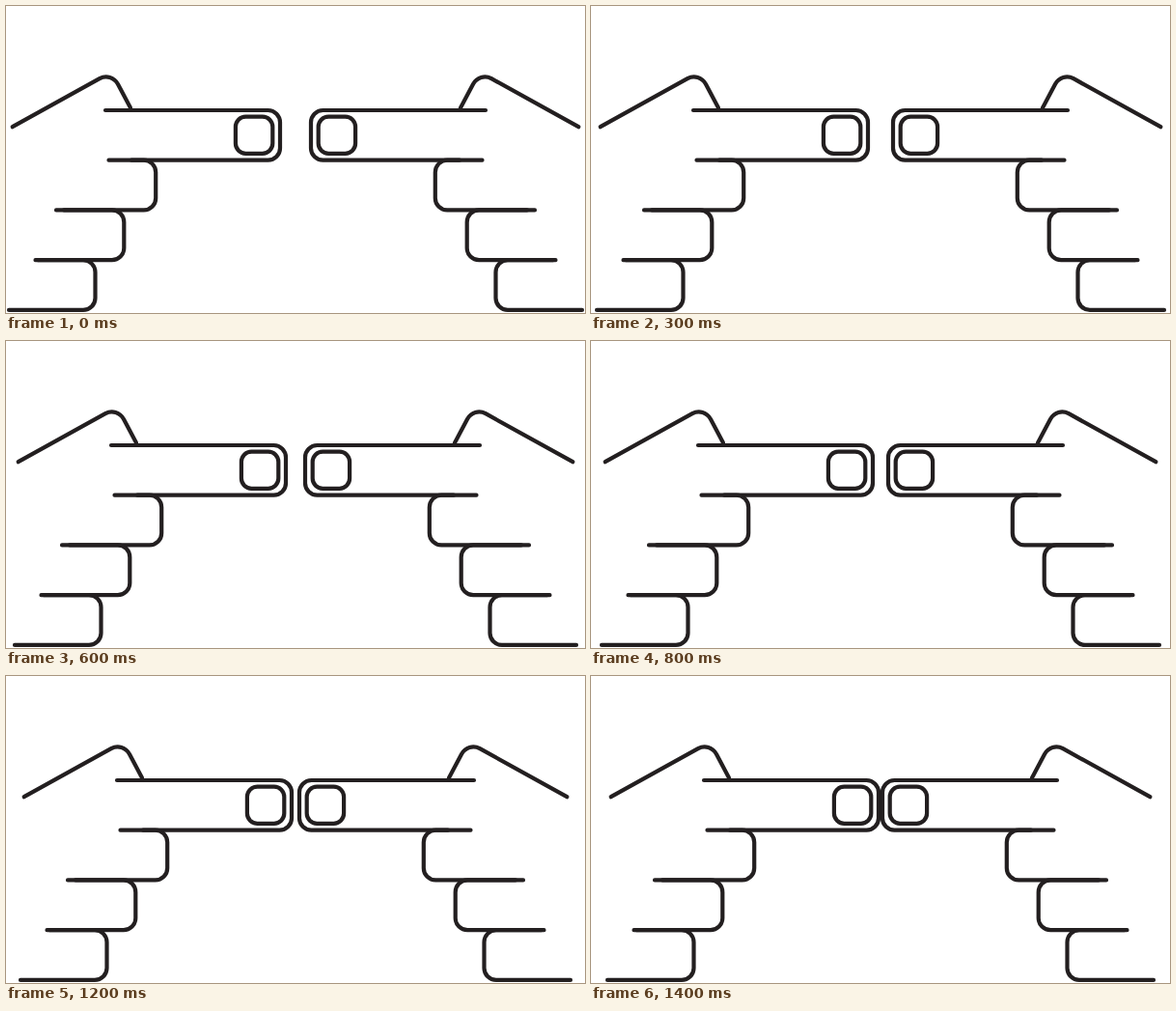
Write an HTML page that moves like this. It is 600 px wide and 318 px high and loops after 1.6 s.

```html
<!DOCTYPE html>
<html lang="en">
<head>
<meta charset="utf-8">
<title>Pointing hands</title>
<style>
  html, body { margin: 0; width: 100%; height: 100%; overflow: hidden; background: #fff; }
  svg { display: block; width: 600px; height: 318px; }
</style>
</head>
<body>
<svg viewBox="0 0 600 318" fill="none" stroke="#231f20" stroke-width="4.2" stroke-linecap="round" stroke-linejoin="round">
  <defs>
    <g id="hand">
      <path d="M6.7 125.2L97 75.2C104 71.5 112 74 116 81L129 105.5"/>
      <path d="M103 108H271.5a12.5 12.5 0 0 1 12.5 12.5V147.2a12.5 12.5 0 0 1-12.5 12.5H106.5"/>
      <rect x="237.9" y="114.6" width="38.4" height="38.2" rx="10.5"/>
      <path d="M130 159.7H142.7a12.5 12.5 0 0 1 12.5 12.5V198.9a12.5 12.5 0 0 1-12.5 12.5H52"/>
      <path d="M60 211.4H109.8a12.5 12.5 0 0 1 12.5 12.5V250.7a12.5 12.5 0 0 1-12.5 12.5H30.5"/>
      <path d="M33 263.2H80a12.5 12.5 0 0 1 12.5 12.5V302.4a12.5 12.5 0 0 1-12.5 12.5H3"/>
    </g>
  </defs>
  <use id="left" href="#hand"/>
  <use id="right" href="#hand"/>
</svg>
<script>
  const LOOP = 1600, STEP = 100, MAX_SHIFT = 14;
  const left = document.getElementById('left');
  const right = document.getElementById('right');

  // The hands approach one pixel per step, rest, then jump back.
  function draw(now) {
    const shift = Math.min(Math.floor(now % LOOP / STEP), MAX_SHIFT);
    left.setAttribute('transform', `translate(${shift} 0)`);
    right.setAttribute('transform', `translate(${600 - shift} 0) scale(-1 1)`);
  }

  const start = performance.now();
  function tick() {
    draw(performance.now() - start);
    requestAnimationFrame(tick);
  }
  tick();
</script>
</body>
</html>
```
